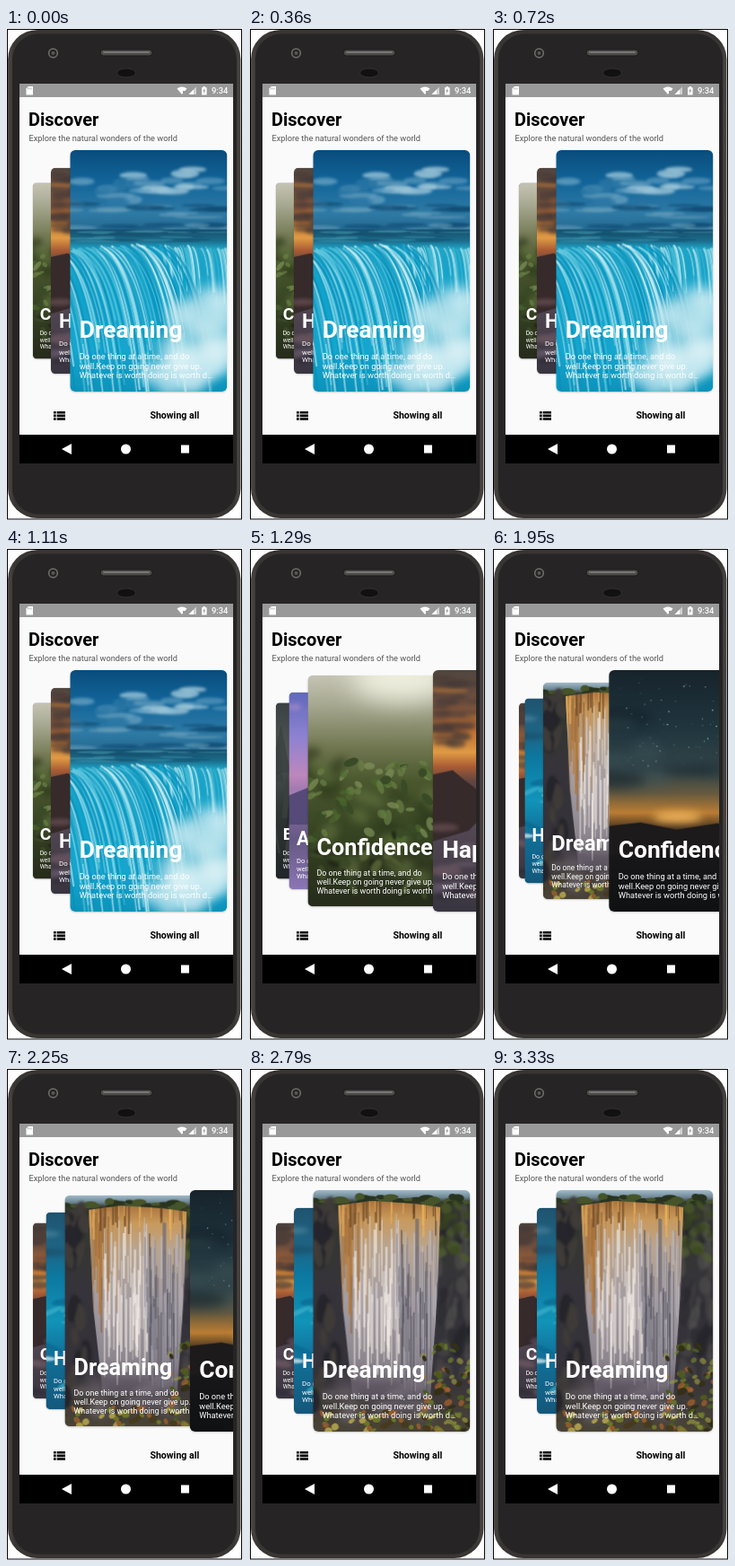
These frames come from a looping animation (264x548 px, 3.36 s). An HTML page with a canvas:

```html
<!DOCTYPE html>
<html lang="en">
<head>
<meta charset="utf-8">
<title>Discover</title>
<style>
  html, body { margin: 0; width: 100%; height: 100%; overflow: hidden; background: #fff; }
  body { position: relative; font-family: Roboto, "Noto Sans", sans-serif; }
  #phone { position: absolute; left: 0; top: 0; }
  #deck { position: absolute; left: 15px; top: 128px; width: 238px; height: 290px; overflow: hidden; }
  .card {
    position: absolute; left: 0; top: 8px; width: 174.5px; height: 268.5px;
    transform-origin: 0 50%; border-radius: 6px; overflow: hidden;
    box-shadow: 0 1px 2px rgba(0, 0, 0, .2); color: #fff; white-space: nowrap;
  }
  .card canvas { position: absolute; left: 0; top: 0; width: 100%; height: 100%; }
  .card b { position: absolute; left: 10.5px; top: 185px; font-size: 26.4px; line-height: 31px; }
  .card p { position: absolute; left: 10.5px; top: 225px; margin: 0; font-size: 9.25px; line-height: 10.7px; }
</style>
</head>
<body>
<svg id="phone" width="264" height="548" viewBox="0 0 264 548">
  <defs>
    <linearGradient id="rim" x2="1" y2="0">
      <stop offset="0" stop-color="#4a4745"/><stop offset=".03" stop-color="#383533"/>
      <stop offset=".97" stop-color="#383533"/><stop offset="1" stop-color="#4a4745"/>
    </linearGradient>
  </defs>
  <rect x="1.500" y="1.500" width="261" height="545.500" fill="#fff" stroke="#000"/>
  <rect x="2" y="2" width="259.500" height="544" rx="33" fill="url(#rim)"/>
  <rect x="7" y="6.500" width="250" height="535" rx="29" fill="#262424"/>
  <circle cx="52.5" cy="28" r="4.800" fill="#242323" stroke="#6b6967" stroke-width="1.700"/>
  <circle cx="52.5" cy="28" r="2" fill="#5a5857"/>
  <rect x="105" y="24" width="58" height="7" rx="3.5" fill="#4d4b49" stroke="#1a1918"/>
  <rect x="108" y="26" width="52" height="2" rx="1" fill="#777573"/>
  <ellipse cx="134" cy="50" rx="10.5" ry="5" fill="#121111" stroke="#343231"/>
  <rect x="15" y="62" width="238" height="391" fill="#fafafa"/>
  <rect x="15" y="62" width="238" height="15" fill="#999"/>
  <rect x="15" y="453" width="238" height="32" fill="#000"/>
  <g fill="#fff">
    <path d="M25 65h5v9.500h-7.500v-7z"/>
    <path d="M190.500 67.500q5.500-3.800 11 0l-2 2.500h-2.500v2.500l-1 1.500z"/>
    <path d="M203.500 74l8.500-8.500v8.500z" opacity=".55"/>
    <path d="M203.500 74l5.500-5.500v5.500z"/>
    <path d="M218 66.200h1.700v-1.200h2.200v1.200h1.700v8.300h-5.600z"/>
    <path d="M73 463v12l-11-6z"/>
    <circle cx="133.500" cy="469" r="5.500"/>
    <rect x="195" y="464.500" width="9" height="9"/>
    <text x="229" y="73" font-size="9.300" font-weight="500">9:34</text>
  </g>
  <path d="M221.300 67l-2 3.500h1.200l-.4 2.500 2.200-3.500h-1.200z" fill="#999"/>
  <path d="M24.500 66.500v2m1.800-2v2m1.800-2v2" stroke="#999" stroke-width=".7"/>
  <path d="M53 428.300h2.700m1 0h9.300M53 431.900h2.700m1 0h9.300M53 435.500h2.700m1 0h9.300" stroke="#000" stroke-width="2.600"/>
  <text x="25" y="109.300" font-size="20" font-weight="700">Discover</text>
  <text x="25.500" y="126" font-size="9.260" fill="#555">Explore the natural wonders of the world</text>
  <text x="160.400" y="435" font-size="10.600" font-weight="700">Showing all</text>
</svg>
<div id="deck"></div>

<script>
const W = 174, H = 268, LOOP = 3360, STEP = 30;
let seed = 1;
const rnd = () => (seed = (seed * 16807) % 2147483647) / 2147483647;
const span = (a, b) => a + (b - a) * rnd();

// Vertical gradient from alternating offset and colour.
function fade(c, x, y, w, h, ...stops) {
  const g = c.createLinearGradient(0, y, 0, y + h);
  for (let i = 0; i < stops.length; i += 2) g.addColorStop(stops[i], stops[i + 1]);
  c.fillStyle = g;
  c.fillRect(x, y, w, h);
}

function shape(c, color, ...p) {
  c.fillStyle = color;
  c.beginPath();
  for (let i = 0; i < p.length; i += 2) c.lineTo(p[i], p[i + 1]);
  c.fill();
}

function blob(c, color, x, y, rx, ry = rx, angle = 0) {
  c.fillStyle = color;
  c.beginPath();
  c.ellipse(x, y, rx, ry, angle, 0, 7);
  c.fill();
}

// Soft patches scattered inside a box.
function scatter(c, n, colors, [x0, y0, x1, y1], rx, ry, blur = 0, tilt = 0) {
  c.filter = blur ? `blur(${blur}px)` : "none";
  for (let i = 0; i < n; i++)
    blob(c, colors[i % colors.length], span(x0, x1), span(y0, y1),
      rx * span(.5, 1.3), ry * span(.5, 1.3), span(-tilt, tilt));
  c.filter = "none";
}

// Strands of falling water; bend carries them to the right before they drop.
function strands(c, n, colors, x0, x1, top, low, high, bend = 0) {
  c.filter = "blur(.6px)";
  for (let i = 0; i < n; i++) {
    const x = span(x0, x1), y = top(x), len = span(low, high);
    c.strokeStyle = colors[i % colors.length];
    c.lineWidth = span(.8, 2.6);
    c.beginPath();
    c.moveTo(x, y);
    c.quadraticCurveTo(x + bend * .7, y + len * .12, x + bend, y + len);
    c.stroke();
  }
  c.filter = "none";
}

function blueFalls(c) {
  fade(c, 0, 0, W, 100, 0, "#0a4d7d", .35, "#12659a", .7, "#2f7ba6", 1, "#1c5f85");
  scatter(c, 16, ["#9cc5d8cc", "#5f9dc0aa"], [70, 18, W, 48], 15, 4, 1.5);
  scatter(c, 12, ["#6fa6c4aa", "#2f7aa6aa"], [0, 28, 90, 58], 17, 4, 1.5);
  scatter(c, 24, ["#114d75aa", "#6fa3bd88"], [0, 58, W, 88], 22, 2.5, 1);
  fade(c, 0, 88, W, H - 88, 0, "#184f6d", .07, "#1b6d8c", .12, "#20a4c6", .4, "#10a3cb", .75, "#16a6ce", 1, "#0b93bb");
  scatter(c, 24, ["#144f6e88", "#3f90a988"], [0, 89, W, 102], 22, 1.2);
  const lip = x => 108 - 4 * Math.sin(x / 55) + span(0, 4);
  strands(c, 45, ["#c9f0f5aa", "#4cbdd6aa"], 90, W + 20, lip, 25, 75, 8);
  strands(c, 130, ["#dcf6faaa", "#078db8aa", "#6bd0e4aa", "#0a98c399"], -70, 110, lip, 80, 175, 48);
  scatter(c, 16, ["#d9f1f6aa", "#b2e2ecaa"], [118, 165, W, 230], 20, 14, 8);
  scatter(c, 16, ["#e3f4f7bb", "#c1e8f0aa"], [100, 222, W, H], 22, 13, 7);
}

function sunset(c) {
  fade(c, 0, 0, W, H, 0, "#514740", .14, "#71503e", .25, "#b46a33", .34, "#e09b45", .4, "#a95c34", .46, "#614541", .65, "#534853", 1, "#393540");
  scatter(c, 34, ["#483c3aaa", "#df8b3c77", "#67493caa"], [0, 8, W, 92], 24, 3.5, 2);
  scatter(c, 14, ["#463a38aa"], [0, 5, 34, 95], 14, 5, 2);
  blob(c, "#ffd887", 76, 91, 6);
  shape(c, "#372a2b", 0, 116, 22, 111, 35, 122, 46, 130, 66, 150, 40, 178, 0, 190);
  shape(c, "#3b2c31", W, 112, 142, 126, 120, 152, 136, 182, W, 192);
  scatter(c, 28, ["#77687a77", "#2d293699", "#a0798055"], [0, 165, W, H], 19, 5, 2, .4);
}

function leaves(c) {
  fade(c, 0, 0, W, H, 0, "#c5c4b4", .12, "#a9aa93", .3, "#747a54", .45, "#4c592f", .7, "#364322", 1, "#262b1b");
  c.filter = "blur(14px)";
  blob(c, "#eeeede", 108, 4, 58, 26);
  c.filter = "none";
  scatter(c, 26, ["#2c371c99", "#68784488"], [0, 80, W, H], 16, 10, 4, 1);
  scatter(c, 80, ["#6a8346aa", "#4d672faa", "#82945caa", "#384b26"], [0, 100, W, 195], 7, 4, .7, 1.5);
  scatter(c, 34, ["#3b4928", "#505c32", "#232a17"], [0, 185, W, H], 8, 4, 1, 1.5);
}

function violet(c) {
  fade(c, 0, 0, W, H, 0, "#6169bd", .22, "#8d82d1", .42, "#bd88bd", .56, "#8b6da4", .75, "#655883", 1, "#8c77b5");
  scatter(c, 24, ["#d3a1cb77", "#5959a877", "#a69be077"], [0, 15, W, 150], 20, 5, 3);
  shape(c, "#554a78", 0, 140, 45, 122, 90, 150, 130, 128, W, 145, W, 180, 0, 180);
}

function forest(c) {
  fade(c, 0, 0, W, H, 0, "#3c4244", .3, "#505554", .6, "#303735", 1, "#222527");
  for (let i = 0; i < 46; i++) {
    const x = span(-5, W), y = span(20, 190), s = span(7, 16);
    shape(c, i % 2 ? "#242a2bcc" : "#3a4240cc", x, y, x + s, y + 72, x - s, y + 72);
  }
}

function night(c) {
  fade(c, 0, 0, W, H, 0, "#17242c", .25, "#21363f", .42, "#35474a", .51, "#665a3f", .59, "#ba7d34", .64, "#614423", .68, "#211e1c", .78, "#17171a", 1, "#101113");
  scatter(c, 9, ["#3f575e66", "#15212899"], [0, 50, W, 125], 36, 9, 6);
  scatter(c, 75, ["#cfe3eb", "#7c9ead", "#486b7a"], [10, 2, W, 108], .65, .65);
  c.filter = "blur(5px)";
  blob(c, "#f0b45a", 76, 163, 27, 6);
  c.filter = "none";
  shape(c, "#1c1a1a", 0, 173, 35, 169, 75, 177, 120, 170, W, 178, W, 205, 0, 205);
}

function goldFalls(c) {
  fade(c, 0, 0, W, H, 0, "#a3bccb", .03, "#6f8794", .05, "#34382d", .4, "#36343a", .75, "#35323a", 1, "#4a4436");
  scatter(c, 30, ["#29341f", "#46542a"], [0, 7, W, 15], 8, 3.5, .5);
  scatter(c, 44, ["#4a484699", "#24242b99", "#5a5a5577"], [134, 20, W, 205], 6, 13, 1.5, .3);
  scatter(c, 20, ["#4c5c2aaa", "#39461faa"], [140, 15, W, 75], 6, 5, 1, 1);
  scatter(c, 30, ["#25252b", "#3f3b38"], [0, 18, 26, 235], 6, 13, 1.5, .3);
  c.save();
  c.beginPath();
  [28, 17, 65, 12, 112, 15, 141, 19, 138, 110, 130, 230, 44, 230, 33, 130]
    .forEach((v, i, a) => i % 2 || c.lineTo(v, a[i + 1]));
  c.clip();
  fade(c, 20, 10, 125, 222, 0, "#a8713c", .1, "#c99a5c", .24, "#b9a591", .5, "#a39ca2", .8, "#8d8790", 1, "#615a66");
  strands(c, 40, ["#b57a3baa", "#8d633baa", "#c49660aa"], 26, 62, () => span(12, 40), 40, 130);
  strands(c, 60, ["#f2ebe4aa", "#dcd3ccaa"], 45, 95, () => span(28, 150), 30, 90);
  strands(c, 70, ["#6d6974aa", "#92909caa", "#575562aa", "#bdb9bf99"], 92, 142, () => span(25, 150), 30, 100);
  strands(c, 26, ["#684623aa", "#edb45baa"], 28, 140, () => 12, 12, 40);
  c.restore();
  scatter(c, 26, ["#857d8877", "#56505a88"], [18, 205, 125, 255], 15, 7, 4);
  scatter(c, 70, ["#73852daa", "#b0652aaa", "#4b5a20", "#98983faa", "#332f19"], [122, 170, W, H], 4, 3, .6, 1);
  scatter(c, 40, ["#6c742a", "#473a1d", "#a89a4a", "#8f5a2d"], [0, 246, 130, H], 4, 3, .6, 1);
}

function ocean(c) {
  fade(c, 0, 0, W, H, 0, "#1f5470", .2, "#1f6787", .32, "#0d78a0", .55, "#1294b9", .72, "#11719a", 1, "#14587c");
  scatter(c, 14, ["#6b9eb577", "#184b6799"], [0, 5, W, 65], 24, 5, 3);
  scatter(c, 60, ["#e0f3f5bb", "#0b6a90bb", "#3fb5cdaa"], [0, 100, W, 235], 15, 3.5, 1.2, .5);
}

const cards = [
  ["Dreaming", blueFalls], ["Happiness", sunset], ["Confidence", leaves],
  ["Ambition", violet], ["Believe", forest], ["Confidence", night],
  ["Dreaming", goldFalls], ["Happiness", ocean], ["Confidence", sunset]
].map(([title, paint], i) => {
  const el = document.createElement("div");
  el.className = "card";
  el.style.zIndex = 20 - i;
  el.innerHTML = `<canvas width="${W}" height="${H}"></canvas><b>${title}</b>
    <p>Do one thing at a time, and do<br>well.Keep on going never give up.<br>Whatever is worth doing is worth d…</p>`;
  seed = 71 + i * 37;
  paint(el.firstChild.getContext("2d"));
  document.getElementById("deck").append(el);
  return el;
});

// Fling through the deck: time, page, speed in pages per second.
const fling = [[1125, 0, 11], [1290, 1.725, 9.9], [1950, 5.32, 2.1], [2250, 5.725, .9], [2750, 6, 0]];

function pageAt(t) {
  if (t <= fling[0][0]) return 0;
  const k = fling.findIndex(p => t < p[0]);
  if (k < 0) return 6;
  const [t0, p0, v0] = fling[k - 1], [t1, p1, v1] = fling[k];
  const d = t1 - t0, u = (t - t0) / d, w = 1 - u;
  return w * w * (1 + 2 * u) * p0 + u * u * (3 - 2 * u) * p1
    + (u * w * w * v0 - u * u * w * v1) * d / 1000;
}

// The front card slides off to the right; those behind grow into its place.
function place(el, depth) {
  const d = Math.min(depth, 2);
  const x = d < 0 ? 71.3 - 184 * d : d < 1 ? 71.3 - 21.3 * d : 70 - 20 * d;
  el.style.visibility = depth <= -1 || depth >= 4 ? "hidden" : "visible";
  el.style.transform = `translateX(${x - 15}px) scale(${d < 0 ? 1 : .853 ** d})`;
}

function draw(now) {
  const t = Math.floor((now % LOOP) / STEP) * STEP;
  const page = pageAt(t);
  cards.forEach((el, i) => place(el, i - page));
}

const start = performance.now();
function tick() {
  draw(performance.now() - start);
  requestAnimationFrame(tick);
}
tick();
</script>
</body>
</html>
```
